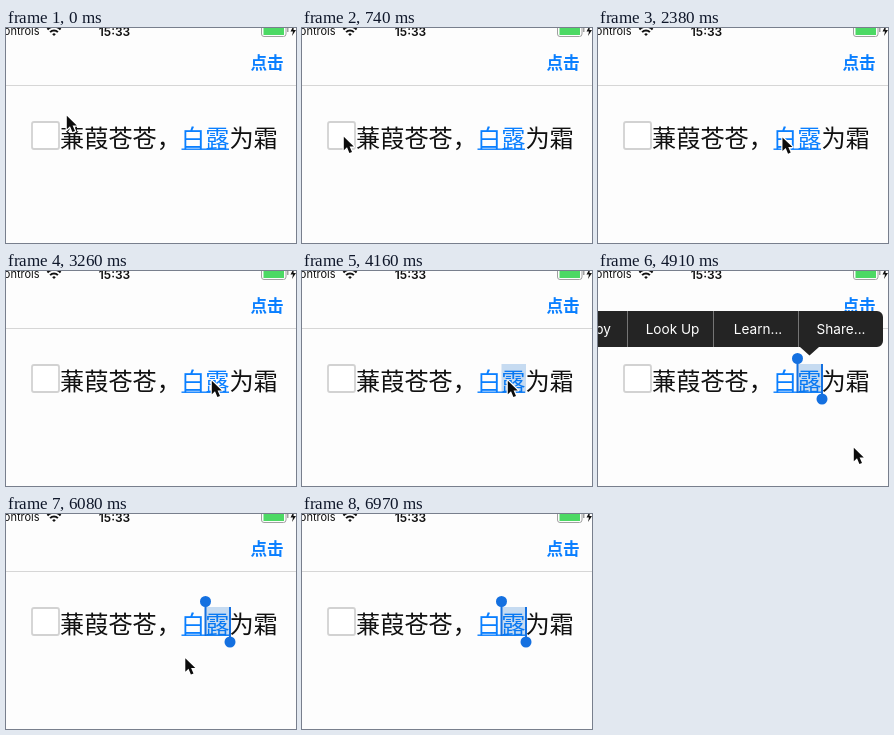
An HTML page with a canvas that plays this animation: 290x215 px, repeating every 8.02 s.

```html
<!DOCTYPE html>
<html lang="zh-CN">
<head>
<meta charset="utf-8">
<title>Text view</title>
<style>
html, body { margin: 0; width: 100%; height: 100%; overflow: hidden; background: #fdfdfd; }
canvas { display: block; width: 290px; height: 215px; }
</style>
</head>
<body>
<canvas id="stage"></canvas>
<script>
const W = 290, H = 215, LOOP = 8020, TICKS = 54;
const LEAD = 20; // ms, absorbs rounding of tick times
const SANS = 'Inter, "Noto Sans", sans-serif';
const CJK = '"Noto Sans CJK SC", "Noto Sans CJK", sans-serif';
const BLUE = '#0a7fff', HANDLE = '#1470e0';

const canvas = document.getElementById('stage');
const ctx = canvas.getContext('2d');
const dpr = window.devicePixelRatio || 1;
canvas.width = W * dpr;
canvas.height = H * dpr;

// Pointer path: tick, x, y
const path = [
  [1, 60, 87], [2, 57, 91], [4, 43, 105], [5, 41, 108], [6, 47, 108],
  [14, 47, 108], [17, 252, 109], [18, 224, 109], [19, 205, 109],
  [30, 205, 109], [33, 255, 176], [35, 235, 149], [37, 196, 141],
  [40, 192, 142], [42, 165, 145], [46, 267, 48]
];

function pointerAt(tick) {
  if (tick <= path[0][0]) return path[0].slice(1);
  for (let i = 1; i < path.length; i++) {
    const [t0, x0, y0] = path[i - 1], [t1, x1, y1] = path[i];
    if (tick <= t1) {
      const k = (tick - t0) / (t1 - t0);
      return [x0 + (x1 - x0) * k, y0 + (y1 - y0) * k];
    }
  }
  return null;
}

function rect(x, y, w, h, color) {
  ctx.fillStyle = color;
  ctx.fillRect(x, y, w, h);
}

function rounded(x, y, w, h, r) {
  ctx.beginPath();
  ctx.roundRect(x, y, w, h, r);
}

function poly(points) {
  ctx.beginPath();
  points.forEach(([x, y], i) => i ? ctx.lineTo(x, y) : ctx.moveTo(x, y));
}

function text(str, x, y, font, color, align = 'left') {
  ctx.font = font;
  ctx.fillStyle = color;
  ctx.textAlign = align;
  ctx.fillText(str, x, y);
}

function dot(x, y, r, color) {
  ctx.beginPath();
  ctx.arc(x, y, r, 0, Math.PI * 2);
  ctx.fillStyle = color;
  ctx.fill();
}

function drawBars() {
  rect(0, 0, W, H, '#fdfdfd');
  rect(0, 57, W, 1, '#d6d6d6');
  text('Controls', 33.5, 7, '11px ' + SANS, '#111', 'right');
  text('15:33', 108.5, 7.5, '600 12px ' + SANS, '#111', 'center');

  // Wi-Fi
  ctx.strokeStyle = '#111';
  ctx.lineWidth = 2;
  for (const r of [1.5, 5.5, 9.3]) {
    ctx.beginPath();
    ctx.arc(48, 8, r, -Math.PI * 0.75, -Math.PI * 0.25);
    ctx.stroke();
  }

  // Battery
  rounded(255.5, -4, 24.5, 12.5, 2.5);
  ctx.strokeStyle = '#a0a0a0';
  ctx.lineWidth = 1;
  ctx.stroke();
  rect(257.5, -3, 20.5, 10, '#4cd964');
  rect(281, 0, 1.5, 4, '#a0a0a0');
  poly([[288, -3], [284.5, 3.5], [287, 3.5], [286, 8], [290, 2], [287.5, 2]]);
  ctx.fillStyle = '#111';
  ctx.fill();

  text('点击', 261, 41.3, '600 16.6px ' + CJK, BLUE, 'center');
}

function drawCheckbox(checked) {
  if (!checked) {
    rounded(26, 94, 27, 27, 2);
    ctx.fillStyle = '#fff';
    ctx.fill();
    ctx.strokeStyle = '#d2d2d2';
    ctx.lineWidth = 1.8;
    ctx.stroke();
    return;
  }
  rounded(24.5, 93.3, 29.5, 28.7, 1);
  ctx.fillStyle = '#1a6dbb';
  ctx.fill();
  poly([[30.5, 106], [37, 112.3], [48.7, 100.8]]);
  ctx.strokeStyle = '#fff';
  ctx.lineWidth = 2.4;
  ctx.stroke();
}

function drawLine() {
  const size = 24.2, left = 54, base = 119;
  const font = size + 'px ' + CJK;
  [...'蒹葭苍苍，白露为霜'].forEach((ch, i) => {
    const link = i === 5 || i === 6;
    text(ch, left + i * size, base, font, link ? BLUE : '#111');
  });
  rect(175.5, 120.5, 47.5, 1.4, BLUE);
}

function shade(x, y, w, h, alpha) {
  rounded(x, y, w, h, 2);
  ctx.fillStyle = `rgba(0,0,0,${alpha})`;
  ctx.fill();
}

function drawSelection(handles) {
  rect(199.5, 93, 24.5, 29, 'rgba(0,95,195,.22)');
  if (!handles) return;
  rect(198.5, 88, 2, 34, HANDLE);
  rect(223, 93, 2, 34, HANDLE);
  dot(199.5, 87.5, 5.5, HANDLE);
  dot(224, 128, 5.5, HANDLE);
}

function drawMenu(alpha) {
  if (!alpha) return;
  ctx.save();
  ctx.globalAlpha = alpha;
  ctx.beginPath();
  ctx.roundRect(-20, 40, 305, 36, 6);
  ctx.moveTo(202, 76);
  ctx.lineTo(211.5, 84.5);
  ctx.lineTo(221, 76);
  ctx.fillStyle = '#242424';
  ctx.fill();
  for (const x of [29, 115, 200]) rect(x, 40, 1, 36, '#757575');
  const font = '13.6px ' + SANS;
  text('Copy', 13, 63, font, '#fff', 'right');
  text('Look Up', 74.5, 63, font, '#fff', 'center');
  text('Learn...', 160, 63, font, '#fff', 'center');
  text('Share...', 243, 63, font, '#fff', 'center');
  ctx.restore();
}

function drawPointer(pos) {
  if (!pos) return;
  ctx.save();
  ctx.translate(pos[0], pos[1]);
  poly([[0.8, 0.8], [0.8, 14.3], [4, 11.3], [6.4, 17], [9, 15.9], [6.6, 10.4], [10.8, 10.4]]);
  ctx.closePath();
  ctx.lineJoin = 'round';
  ctx.strokeStyle = '#fff';
  ctx.lineWidth = 2.4;
  ctx.stroke();
  ctx.fillStyle = '#0c0c0c';
  ctx.fill();
  ctx.restore();
}

function menuAlpha(tick) {
  if (tick < 30 || tick > 37) return 0;
  return { 30: 0.6, 36: 0.5, 37: 0.09 }[tick] || 1;
}

function draw(ms) {
  // The picture advances in even ticks
  const tick = Math.floor((ms + LEAD) / (LOOP / TICKS)) % TICKS;
  ctx.setTransform(dpr, 0, 0, dpr, 0, 0);
  drawBars();
  drawCheckbox(tick >= 9 && tick < 14);
  drawLine();
  if (tick >= 8 && tick < 11) shade(23, 93, 32, 30, tick === 8 ? 0.2 : 0.3);
  if (tick === 21 || tick === 23) shade(173, 93, 53, 31, 0.2);
  if (tick >= 28) drawSelection(tick >= 29);
  drawMenu(menuAlpha(tick));
  drawPointer(pointerAt(tick));
}

const start = performance.now();
function loop() {
  draw((performance.now() - start) % LOOP);
  requestAnimationFrame(loop);
}
loop();
</script>
</body>
</html>
```
